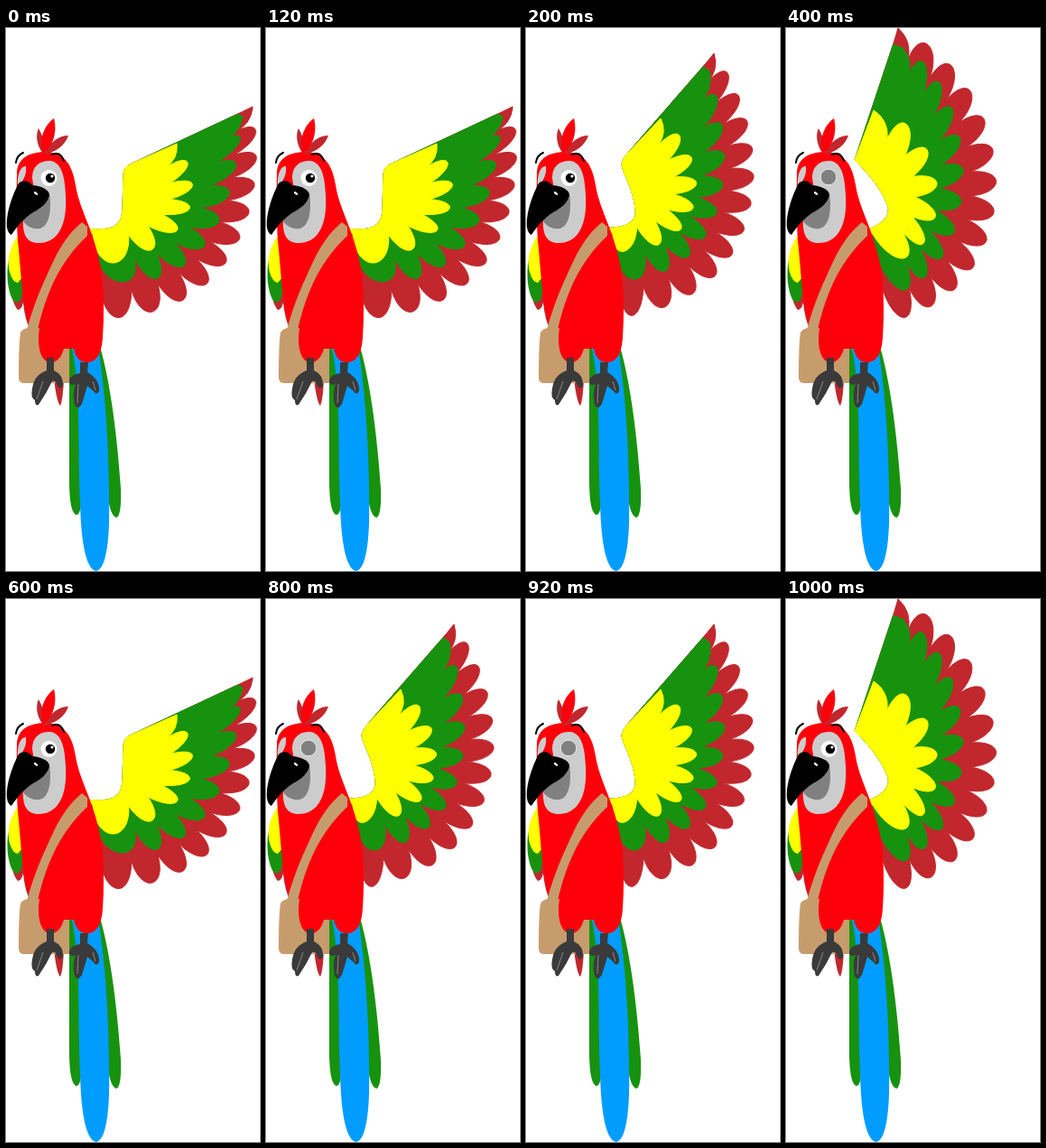
An HTML page that plays this animation: 281x601 px, repeating every 1200 ms.

```html
<!DOCTYPE html>
<html lang="en">
<head>
<meta charset="utf-8">
<title>Waving parrot</title>
<style>
html, body { margin: 0; width: 100%; height: 100%; overflow: hidden; background: #fff; }
svg { display: block; width: 100%; height: 100%; }
</style>
</head>
<body>
<svg viewBox="0 0 281 601">
  <g id="wings"></g>

  <!-- far wing -->
  <path fill="#c1272d" d="M4 280Q6 304 13 312Q17 312 19 304Q21 324 27 334L34 320L20 260Z"/>
  <path fill="#17920f" d="M14 232C3 244-1 268 3 288Q6 303 12 304Q18 302 18 290V250Z"/>
  <path fill="#ff0" d="M16 226C5 239 0 256 4 270Q7 281 13 282L18 276V230Z"/>

  <!-- tail -->
  <path fill="#17920f" d="M70 350V500Q70 537 78 539Q84 538 83 515L90 350ZM98 335C114 375 123 450 127 510Q128 540 122 542Q114 539 112 510L90 345Z"/>
  <path fill="#009dff" d="M71 345C84 400 79 470 82 525C83 575 90 600 100 601C111 599 115 565 114 525C114 450 109 400 101 345Z"/>
  <path fill="#c1272d" d="M53 388Q56 414 60 418Q63 412 64 388Z"/>

  <!-- bag, body, strap -->
  <path fill="#c69c6d" d="M16 337Q19 332 26 332H70V393H19Q14 393 14 386Q14 350 16 337Z"/>
  <path fill="#ff000b" d="M12 162C12 145 24 138 42 137C62 137 73 148 77 174C82 205 101 228 107 280Q109 312 107 342C106 362 99 370 90 370C81 370 77 364 75 355H64C61 366 55 371 48 370C38 368 34 352 37 332L27 333C17 305 17 270 13 235Q11 205 12 162Z"/>
  <path fill="#c69c6d" d="M84 215C60 235 52 260 41 283Q30 308 23 334H35C41 308 50 280 68 255Q78 241 90 230V220Z"/>

  <!-- feet -->
  <g fill="#3a3a3a">
    <path d="M45 365H53V379Q64 384 63 396Q60 401 57 396Q55 390 51 391Q45 404 36 417Q32 419 32 412Q27 410 29 399Q31 384 45 379Z"/>
    <path d="M82 370H91L90 381Q104 389 103 402Q100 407 97 402L90 396L84 416Q79 424 76 417Q73 404 77 394Q70 397 70 390Q72 383 82 382Z"/>
    <path d="M41 391L34 411M80 394L79 415M96 391L99 401" fill="none" stroke="#aaa" stroke-width=".7"/>
  </g>

  <!-- head -->
  <path fill="#c1272d" d="M41 139C33 129 33 117 36 111C40 118 43 126 43 138ZM42 140C48 126 59 119 69 119C65 130 56 137 42 140Z"/>
  <path fill="#ff000b" d="M41 139C36 123 42 108 53 100C57 115 52 131 41 139Z"/>
  <path fill="#ccc" d="M29 166C29 153 37 147 48 147C62 148 65 165 66 185C68 217 58 238 36 238C23 238 18 229 19 211L31 178ZM13 175C12 161 17 152 22 153C23 161 20 169 13 175Z"/>
  <path fill="#808080" d="M48 183C51 204 47 220 37 222C28 223 20 218 18 211L30 190Z"/>
  <path d="M14 172C18 168 25 168 29 174C40 175 48 179 48 185C46 194 38 200 30 204C22 209 13 218 6 229C0 226 0 216 2 205C5 191 10 179 14 172Z"/>
  <ellipse cx="33" cy="183" rx="2.5" ry="1.3" fill="#fff" transform="rotate(35 33 183)"/>
  <path d="M11 149Q12 141 19 138M51 140Q60 136 64 147" fill="none" stroke="#000" stroke-width="2" stroke-linecap="round"/>
  <g id="open">
    <circle cx="47.5" cy="166" r="9" fill="#fff"/>
    <circle cx="49" cy="166" r="5.2"/>
    <circle cx="51" cy="164" r="1.6" fill="#fff"/>
  </g>
  <circle id="shut" cx="47" cy="165" r="8.8" fill="#808080" stroke="#e8e8e8"/>
</svg>
<script>
const $ = id => document.getElementById(id);
const STEP = 200;

// Colour, feather length and the point hidden behind the body.
const layers = [
  { fill: '#c1272d', depth: 27, end: [104, 278] },
  { fill: '#17920f', depth: 26, end: [100, 252] },
  { fill: '#ff0', depth: 24, end: [96, 228] }
];

// Fan centre, shoulder edge and, per layer, a feather count and the Bezier curve its tips follow.
const poses = [
  {
    hub: [130, 195],
    edge: 'M88 222C112 224 129 224 129 198L130 163Q130 154 137 151',
    rows: [
      [11, [273, 87], [288, 175], [269, 313], [121, 320]],
      [9, [262, 98], [255, 160], [242, 287], [128, 281]],
      [7, [189, 128], [218, 165], [221, 239], [118, 260]]
    ]
  },
  {
    hub: [114, 180],
    edge: 'M88 221C112 222 123 214 121 200C118 175 106 160 106 150Q107 145 112 139',
    rows: [
      [13, [208, 28], [275, 110], [281, 295], [115, 318]],
      [10, [203, 48], [233, 135], [232, 263], [121, 278]],
      [8, [149, 100], [205, 135], [210, 245], [109, 247]]
    ]
  },
  {
    hub: [104, 182],
    edge: 'M88 224C108 217 115 208 113 198C105 175 85 155 76 146',
    rows: [
      [13, [124, 0], [266, 60], [270, 287], [128, 320]],
      [11, [129, 22], [215, 62], [222, 257], [129, 290]],
      [7, [97, 91], [184, 105], [186, 238], [129, 255]]
    ]
  }
];

const lerp = (a, b, t) => [a[0] + (b[0] - a[0]) * t, a[1] + (b[1] - a[1]) * t];
const along = (pts, t) => pts.length < 2 ? pts[0]
  : along(pts.slice(1).map((p, i) => lerp(pts[i], p, t)), t);

// The notch between two tips, pulled towards the fan centre.
function valley(a, b, hub, depth) {
  const mid = lerp(a, b, .5);
  return lerp(mid, hub, depth / Math.hypot(mid[0] - hub[0], mid[1] - hub[1]));
}

// A rounded feather from p to q whose end touches tip.
function feather(p, tip, q) {
  const mid = lerp(p, q, .5);
  const dx = (tip[0] - mid[0]) * 4 / 3, dy = (tip[1] - mid[1]) * 4 / 3;
  return `C${p[0] + dx} ${p[1] + dy} ${q[0] + dx} ${q[1] + dy} ${q}`;
}

function layerPath({ hub, edge, rows }, layer) {
  const [count, ...curve] = rows[layer], { depth, end } = layers[layer];
  const tips = Array.from({ length: count }, (_, i) => along(curve, i / (count - 1)));
  const bend = lerp(rows[2][1], rows[0][1], [.85, .8, 0][layer]);  // leaves the leading edge here
  const top = tips[0];
  let p = valley(top, tips[1], hub, depth);
  const [x, y] = lerp(top, p, .5), dx = p[0] - top[0], dy = p[1] - top[1];
  let d = `${edge}L${bend}L${top}Q${x + dy * .3} ${y - dx * .3} ${p}`;
  for (let i = 1; i < count; i++) {
    const q = i + 1 < count ? valley(tips[i], tips[i + 1], hub, depth) : end;
    d += feather(p, tips[i], q);
    p = q;
  }
  return d + 'Z';
}

$('wings').innerHTML = poses.map(pose => '<g>' + layers.map(({ fill }, i) =>
  `<path fill="${fill}" stroke="${fill}" stroke-linejoin="round" d="${layerPath(pose, i)}"/>`
).join('') + '</g>').join('');

const wings = [...$('wings').children];
const show = (el, on) => el.setAttribute('visibility', on ? 'visible' : 'hidden');

function draw(now) {
  const step = Math.floor(now / STEP) % 6;
  const blink = step === 2 || step === 4;
  wings.forEach((wing, i) => show(wing, i === step % 3));
  show($('open'), !blink);
  show($('shut'), blink);
}

const start = performance.now();
function tick() {
  draw(performance.now() - start);
  requestAnimationFrame(tick);
}
tick();
</script>
</body>
</html>
```
